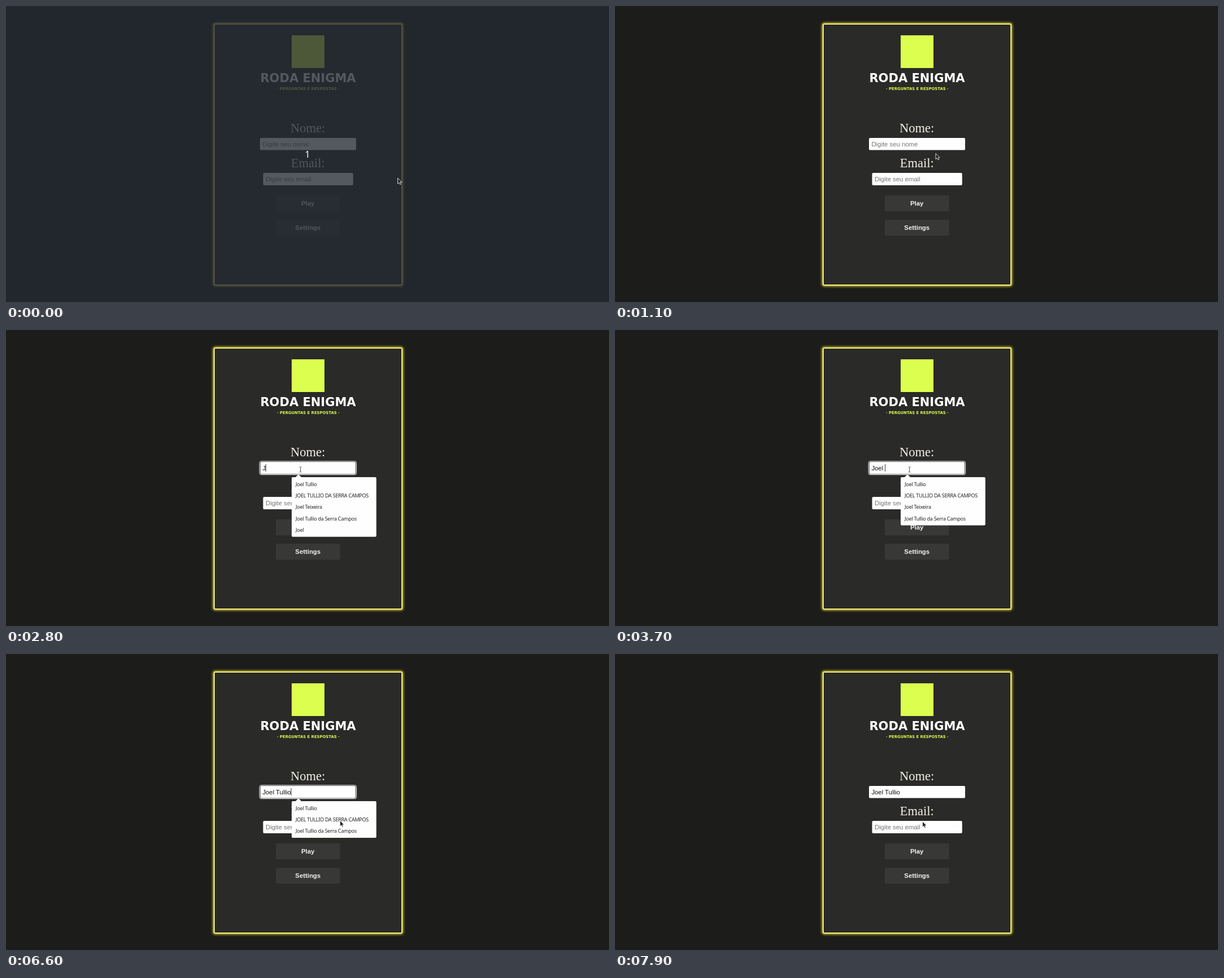
Recreate the animation shown at these times as an HTML page. Size 1066 by 525 pixels, loop 8 s.

```html
<!DOCTYPE html>
<html lang="pt">
<head>
<meta charset="utf-8">
<title>Login</title>
<style>
  html, body { margin: 0; width: 100%; height: 100%; overflow: hidden; background: #1c1c1a; }
  svg { display: block; width: 1066px; height: 525px; }
  text { white-space: pre; }
  .card { position: absolute; left: 367px; top: 31px; width: 330px; height: 461px;
    border: 2px solid #f6ef7c; border-radius: 3px; background: #2a2a28; box-shadow: 0 0 4px 1px #e6dc3c; }
  svg { position: absolute; left: 0; top: 0; }
  .mid { text-anchor: middle; }
  .title { font: bold 21px "DejaVu Sans", sans-serif; fill: #fff; }
  .sub { font: bold 6.85px "DejaVu Sans", sans-serif; fill: #dcff4f; }
  .label { font: 22.5px "Liberation Serif", serif; fill: #f5f2ea; }
  .field { font: 11.33px "Liberation Sans", sans-serif; fill: #757575; }
  .btn { font: bold 11.33px "Liberation Sans", sans-serif; fill: #f2f2f0; }
  #rows { font: 9px "Noto Sans", sans-serif; letter-spacing: -.25px; fill: #222; }
  .count { font: 16.5px "Noto Sans", sans-serif; fill: #fff; }
</style>
</head>
<body>
<div class="card"></div>
<svg viewBox="0 0 1066 525">
  <rect x="505" y="52" width="58" height="58" fill="#dcff4f"/>
  <text class="title mid" x="534" y="135.3">RODA ENIGMA</text>
  <text class="sub mid" x="534.3" y="149">· PERGUNTAS E RESPOSTAS ·</text>

  <text class="label mid" x="533.7" y="223.5">Nome:</text>
  <rect id="ring" x="448.2" y="232.8" width="171.3" height="23.8" rx="3" fill="#222" stroke="#fff"/>
  <rect x="449" y="234" width="170" height="21.6" rx="2" fill="#fefefe" id="box"/>
  <text class="field" id="name" x="453.4" y="248.5"></text>
  <rect id="caret" y="238" width=".9" height="13" fill="#222"/>

  <text class="label mid" x="533.7" y="285.7">Email:</text>
  <rect x="454.5" y="296" width="159.2" height="22" rx="2" fill="#fefefe"/>
  <text class="field" x="459" y="310.8">Digite seu email</text>

  <g fill="#383836">
    <rect x="477" y="336" width="113.5" height="28.3" rx="1.5"/>
    <rect x="477" y="379" width="113.5" height="28.3" rx="1.5"/>
  </g>
  <text class="btn mid" x="533.7" y="354">Play</text>
  <text class="btn mid" x="533.7" y="397">Settings</text>

  <g id="panel">
    <path d="M511.5 261.5L517 256L522.5 261.5Z" fill="#fefefe"/>
    <rect id="sheet" x="505" y="261" rx="2" fill="#fefefe"/>
    <g id="rows"></g>
  </g>

  <g id="dim">
    <rect width="1066" height="525" fill="rgb(37,41,50)" opacity=".78"/>
    <text class="count mid" x="533" y="268.6">1</text>
  </g>

  <path id="arrow" d="M0 0V10.2L2.3 8.2L4 11.6L5.8 10.8L4.2 7.5H7.3Z" fill="#222" stroke="#fff" stroke-width=".8"/>
  <path id="beam" d="M-2 -4.5H-.6L0 -4L.6 -4.5H2M0 -4V4M-2 4.5H-.6L0 4L.6 4.5H2" fill="none" stroke="#444" stroke-width=".9"/>
</svg>
<script>
const $ = id => document.getElementById(id);
const show = (id, on) => $(id).style.display = on ? "" : "none";
const at = (id, x, y) => $(id).setAttribute("transform", `translate(${x} ${y})`);

const fullName = "Joel Tullio";
const keyTimes = [2700, 3100, 3300, 3400, 3600, 4300, 4500, 4700, 5000, 5300, 5400];
const history = ["O mestre", "Joel Tullio", "JOEL TULLIO DA SERRA CAMPOS", "Joel Teixeira",
  "Joel Tullio da Serra Campos", "Joel", "sdfg"];
const caretOff = [[2100, 2700], [4200, 4300], [6000, 6500]];

// Pointer moves: start, end, then start, control and end points of a curve
const moves = [
  [400, 1300, [692.5, 305], [612, 277], [531, 249]],
  [1300, 1400, [531, 249], [526, 248], [520.5, 247.5]],
  [6100, 7000, [520.5, 247.5], [575, 372], [660, 203.5]],
  [7100, 7900, [660, 203.5], [630, 176], [543.7, 297]]
];

const typed = t => fullName.slice(0, keyTimes.filter(k => k <= t).length);

function suggestions(query) {
  if (!query) return history.filter(h => h !== "Joel Teixeira");
  return history.filter(h => h.toLowerCase().startsWith(query.toLowerCase()));
}

function pointer(t) {
  const [start, end, a, b, c] = moves.findLast(m => t >= m[0]) || moves[0];
  const u = Math.min(1, Math.max(0, (t - start) / (end - start))), v = 1 - u;
  return a.map((p, i) => v * v * p + 2 * u * v * b[i] + u * u * c[i]);
}

function drawPanel(t) {
  const open = t >= 1500 && t < 7200;
  show("panel", open);
  if (!open) return;
  const moving = t < 1600 || t >= 7100;
  const items = suggestions(typed(t - 100));
  $("sheet").setAttribute("width", moving ? 146 : 149.7);
  $("sheet").setAttribute("height", items.length * 20.37 + 4);
  $("rows").innerHTML = items.map((s, i) => `<text x="512" y="${276.5 + i * 20.37}">${s}</text>`).join("");
  at("panel", moving ? 3 : 0, moving ? 1.5 : 0);
  $("panel").setAttribute("opacity", t >= 7100 ? .25 : moving ? .5 : 1);
}

function draw(t) {
  const focus = t >= 1400 && t < 7000, text = typed(t), name = $("name");
  show("dim", t < 100);
  show("ring", focus);
  name.textContent = text || "Digite seu nome";
  name.style.fill = text ? "#111" : "";
  show("caret", focus && !caretOff.some(([a, b]) => t >= a && t < b));
  const width = text ? name.getSubStringLength(0, text.length) : 0;
  $("caret").setAttribute("x", 453.2 + width);
  $("box").setAttribute("x", focus ? 449.7 : 449);
  $("box").setAttribute("width", focus ? 168.4 : 170);
  drawPanel(t);

  const [x, y] = pointer(t);
  const overField = x > 449 && x < 619 && y > 234 && y < 256;
  show("beam", overField);
  show("arrow", !overField);
  at(overField ? "beam" : "arrow", x, y);
}

const begin = performance.now();
function tick() {
  const t = (performance.now() - begin) % 8000;
  draw(Math.floor(t / 100) * 100);
  requestAnimationFrame(tick);
}
tick();
</script>
</body>
</html>
```
